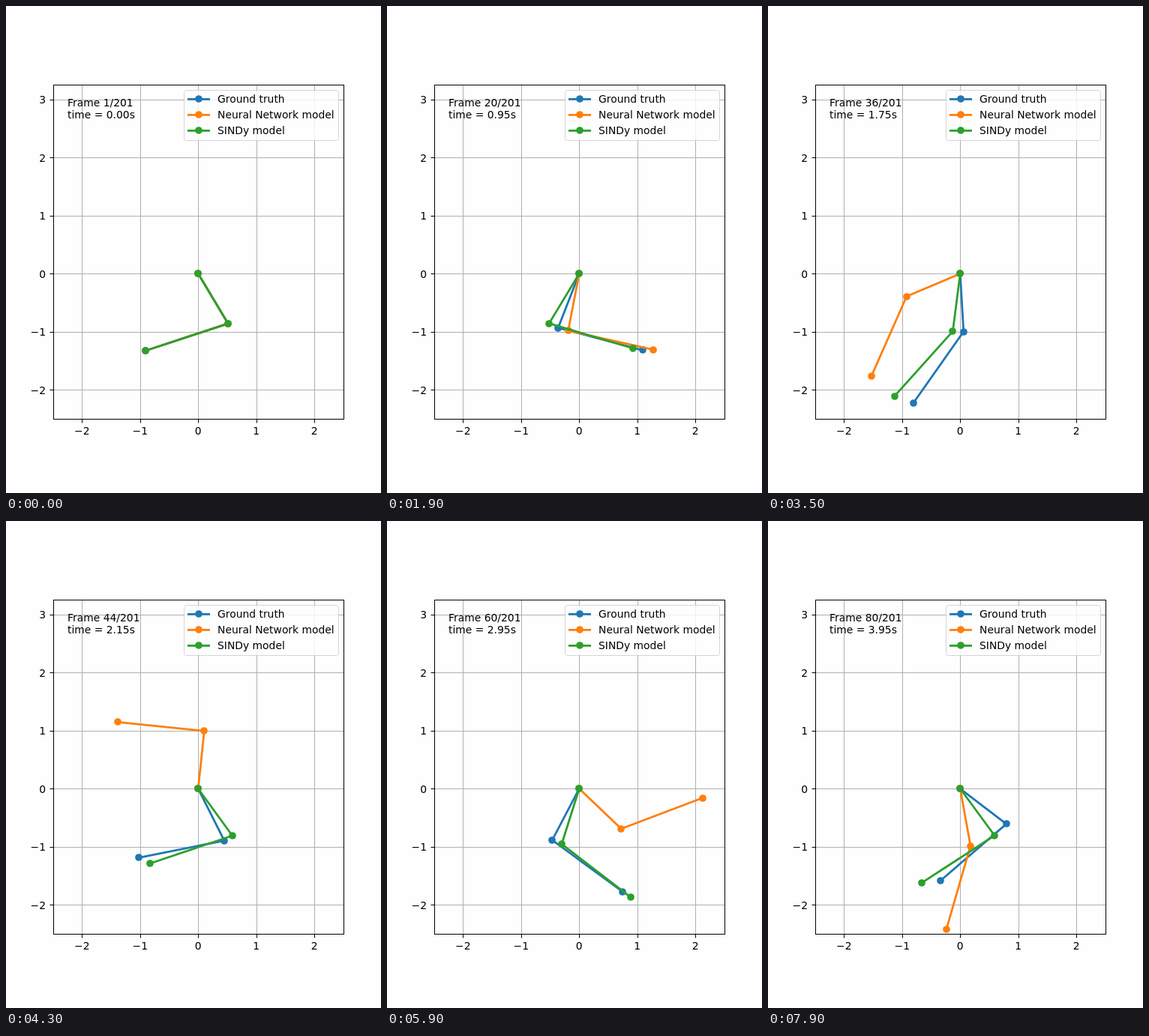
These frames come from a looping animation (500 px wide and 650 px high, 8000 ms). An HTML page:

```html
<!DOCTYPE html>
<html lang="en">
<head>
<meta charset="utf-8">
<title>Double pendulum models</title>
<style>
  html, body { margin: 0; width: 100%; height: 100%; overflow: hidden; background: #fefefe; }
  svg { display: block; width: 500px; height: 650px; }
  text { font: 13.89px "DejaVu Sans", sans-serif; white-space: pre; }
  .grid { stroke: #b0b0b0; }
  .axis { stroke: #000; fill: none; }
  .rod { fill: none; stroke-width: 2.78; stroke-linejoin: round; }
</style>
</head>
<body>
<svg id="stage" viewBox="0 0 500 650"></svg>
<script>
const stage = document.getElementById('stage');
const UNIT = 77.5, X0 = 256.25, Y0 = 357.3;
const LEFT = 63.5, RIGHT = 450.5, TOP = 105.5, BOTTOM = 551.5;
const L1 = 1, L2 = 1.5;
const STEP_MS = 100, STEPS = 80, DT = 0.05;

function add(tag, attrs, parent = stage, text = '') {
  const el = document.createElementNS('http://www.w3.org/2000/svg', tag);
  for (const k in attrs) el.setAttribute(k, attrs[k]);
  el.textContent = text;
  return parent.appendChild(el);
}
const line = (x1, y1, x2, y2, cls) => add('line', { x1, y1, x2, y2, class: cls });
const label = (x, y, text, anchor = 'start') => add('text', { x, y, 'text-anchor': anchor }, stage, text);
const snap = v => Math.floor(v + 0.5) + 0.5;
const signed = n => String(n).replace('-', '\u2212');

// Swings: [time in s, degrees from straight down], mostly the turning points.
// All models share the first swing of each arm.
const upper = (...rest) => [[-0.72, -50], [0.28, 50], ...rest];
const lower = (...rest) => [[-0.9, 76], [0.1, -76], ...rest];
const models = [
  { name: 'Ground truth', color: '#1f77b4',
    a: upper([1.22, -39], [2.11, 27], [3.05, -29.4], [4.2, 63.9]),
    b: lower([1.05, 80], [2.12, -79], [3.21, 76], [4.2, -73]) },
  { name: 'Neural Network model', color: '#ff7f0e',
    a: upper([0.9, -12.5], [1.28, 21], [1.4, 14], [2.15, -186], [2.55, -253.3],
      [2.93, -314], [3.38, -254.5], [4.4, -416.6]),
    b: lower([0.96, 77.5], [1.4, 9.7], [1.8, -30], [2.2, -98], [2.55, -33.8],
      [2.9, 97], [3.38, 175], [3.65, 88], [4.3, -87]) },
  { name: 'SINDy model', color: '#2ca02c',
    a: upper([1.22, -51.5], [2.32, 42], [3.3, -42], [4.14, 48]),
    b: lower([1.05, 78.2], [2.05, -75], [2.55, -20], [3.15, 70], [4.18, -75.5]) }
];

// Cubic ease between points: still at turning points, flowing through the others.
function swing(points, t) {
  const gap = j => points[j + 1][0] - points[j][0];
  const slope = j => (points[j + 1][1] - points[j][1]) / gap(j);
  const speed = j => {
    if (j === 0 || j === points.length - 1 || slope(j - 1) * slope(j) <= 0) return 0;
    return (slope(j - 1) * gap(j) + slope(j) * gap(j - 1)) / (gap(j - 1) + gap(j));
  };
  const i = points.findIndex(p => p[0] > t) - 1;
  const h = gap(i), u = (t - points[i][0]) / h, v = 1 - u;
  const deg = points[i][1] * (1 + 2 * u) * v * v + points[i + 1][1] * u * u * (3 - 2 * u)
    + h * u * v * (speed(i) * v - speed(i + 1) * u);
  return deg * Math.PI / 180;
}

function pose(m, t) {
  const a = swing(m.a, t), b = swing(m.b, t);
  const x = X0 + UNIT * L1 * Math.sin(a), y = Y0 + UNIT * L1 * Math.cos(a);
  return [[X0, Y0], [x, y], [x + UNIT * L2 * Math.sin(b), y + UNIT * L2 * Math.cos(b)]];
}

// Axes
const defs = add('defs', {});
const frame = { x: LEFT, y: TOP, width: RIGHT - LEFT, height: BOTTOM - TOP };
add('rect', frame, add('clipPath', { id: 'plot' }, defs));
for (let n = -2; n <= 3; n++) {
  const x = X0 + n * UNIT, y = Y0 - n * UNIT, gx = snap(x), gy = snap(y);
  line(LEFT, gy, RIGHT, gy, 'grid');
  line(LEFT - 5, gy, LEFT, gy, 'axis');
  label(53, Math.round(y + 5.5), signed(n), 'end');
  if (n > 2) continue;
  line(gx, TOP, gx, BOTTOM, 'grid');
  line(gx, BOTTOM, gx, BOTTOM + 5, 'axis');
  label(x, 572, signed(n), 'middle');
}

// Pendulums: a rod line with dots that sit on whole pixels
const plot = add('g', { 'clip-path': 'url(#plot)' });
const dot = (color, parent) => add('circle', { r: 4.86, fill: color }, parent);
const place = (el, x, y) => {
  el.setAttribute('cx', Math.round(x));
  el.setAttribute('cy', Math.round(y));
};
for (const m of models) {
  m.rod = add('polyline', { class: 'rod', stroke: m.color }, plot);
  m.dots = [0, 1, 2].map(() => dot(m.color, plot));
}
add('rect', { ...frame, class: 'axis' });
const counter = label(82, 134, ''), clock = label(82, 150, '');

// Legend
add('rect', { x: 237.5, y: 112.5, width: 206, height: 67, rx: 2.8, fill: '#fff', stroke: '#ccc', opacity: 0.8 });
models.forEach((m, i) => {
  const y = 124.4 + 21 * i;
  add('line', { x1: 242, y1: y, x2: 272, y2: y, class: 'rod', stroke: m.color });
  place(dot(m.color, stage), 257, y);
  label(282, 129 + 21 * i, m.name);
});

function draw(now) {
  const step = Math.floor(now / STEP_MS) % STEPS, t = step * DT;
  for (const m of models) {
    const joints = pose(m, t);
    m.rod.setAttribute('points', joints.join(' '));
    joints.forEach(([x, y], i) => place(m.dots[i], x, y));
  }
  counter.textContent = `Frame ${step + 1}/201`;
  clock.textContent = `time = ${t.toFixed(2)}s`;
}
const begin = performance.now();
function tick() {
  draw(performance.now() - begin);
  requestAnimationFrame(tick);
}
tick();
</script>
</body>
</html>
```
